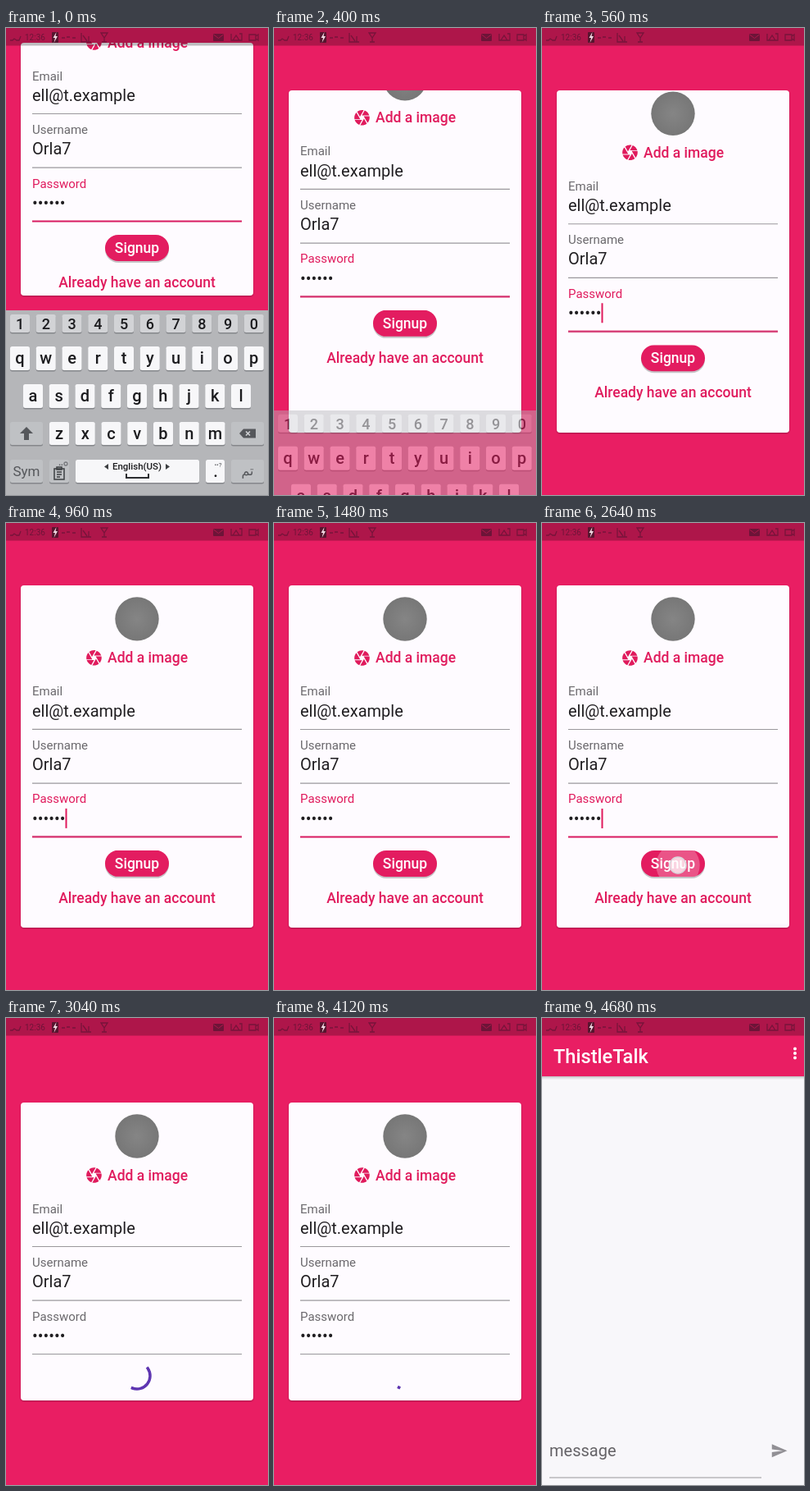
An HTML page that plays this animation: 320x569 px, repeating every 7040 ms.

```html
<!DOCTYPE html>
<html lang="en">
<head>
<meta charset="utf-8">
<title>Signup flow</title>
<style>
  html, body { margin: 0; width: 100%; height: 100%; overflow: hidden; }
  body { position: relative; background: #e91e63; font-family: Roboto, sans-serif; }
  svg { position: absolute; left: 0; top: 0; width: 320px; height: 569px; overflow: hidden; }
  .stage { position: absolute; left: 0; top: 0; width: 320px; height: 569px; overflow: hidden; background: #e91e63; }
  .stage * { animation-duration: 7040ms; animation-iteration-count: infinite; }
  .step { animation-timing-function: step-end; }
  .smooth { animation-timing-function: linear; }

  .card { position: absolute; left: 18px; width: 284px; overflow: hidden; border-radius: 4px;
    background: #fefbff; animation-name: card; }
  .shade { position: absolute; left: 18px; width: 284px; border-radius: 4px;
    box-shadow: 0 1px 2px rgba(0,0,0,.3); animation-name: card; }
  .card svg { left: -18px; height: 600px; }
  @keyframes card {
    0% { top: 18px; height: 308px; }
    4.261% { top: 76px; height: 417px; }
    39.73%, 100% { top: 103px; height: 363px; }
  }

  .label { font-size: 15px; fill: #6b696d; }
  .value { font-size: 20px; fill: #201e21; }
  .bold { font-size: 17.5px; font-weight: 500; fill: #e01b5d; }
  .rule { stroke: #9a989c; stroke-width: 1.2; }

  #focusLabel { animation-name: tint; }
  @keyframes tint { 0%, 39.73% { fill: #e01b5d; } 42.571%, 100% { fill: #6b696d; } }
  #focusRule { stroke: #d81b60; stroke-width: 2; animation-name: blur; }
  @keyframes blur { 0%, 39.73% { opacity: 1; } 42.571%, 100% { opacity: 0; } }
  #cursor { animation-name: blink; }
  @keyframes blink {
    0% { opacity: 0; } 7.244% { opacity: 1; } 14.347% { opacity: 0; } 21.449% { opacity: 1; }
    28.551% { opacity: 0; } 35.653% { opacity: 1; } 39.73%, 100% { opacity: 0; }
  }
  #buttons { animation-name: buttons; }
  @keyframes buttons { 0% { opacity: 1; } 39.73%, 100% { opacity: 0; } }
  #ripple { animation-name: ripple; }
  @keyframes ripple {
    0%, 35.795% { r: 0; opacity: .25; } 38.5% { r: 42px; opacity: .25; } 39.6%, 100% { r: 42px; opacity: 0; }
  }
  #glow { transform-origin: 0 417px; animation-name: glow; }
  @keyframes glow {
    0%, 24.148% { opacity: 0; transform: scaleY(0); }
    30.114% { opacity: .166; transform: scaleY(.68); }
    32.102% { opacity: .17; transform: scaleY(.7); }
    38.352%, 100% { opacity: 0; transform: scaleY(0); }
  }

  #touch { animation-name: tap; }
  @keyframes tap {
    0% { opacity: 0; } 23.011% { opacity: 1; } 32.102% { opacity: 0; }
    35.795% { opacity: 1; } 37.784%, 100% { opacity: 0; }
  }
  #touch circle { animation-name: drag; }
  @keyframes drag {
    0%, 23.011% { transform: translate(272px, 392px); }
    30.114% { transform: translate(287px, 268px); }
    32.102% { transform: translate(287px, 257px); }
    32.2%, 100% { transform: translate(166px, 417px); }
  }

  #keyboard { animation-name: hide; animation-timing-function: ease-in; }
  @keyframes hide {
    0%, 3.835% { transform: none; opacity: 1; }
    6.534%, 100% { transform: translateY(225px); opacity: 0; }
  }
  .cap { font-size: 20px; font-weight: 500; fill: #1c1c1f; text-anchor: middle; }
  .hint { fill: #55575b; text-anchor: middle; }

  #chat { animation-name: chat; }
  @keyframes chat { 0% { opacity: 0; } 60.653%, 100% { opacity: 1; } }
  .spinner { fill: none; stroke: #5e35b1; stroke-width: 3.5; stroke-linecap: square; }
</style>
</head>
<body>
<div class="stage">
  <div class="shade step"></div>
  <div class="card step">
    <svg viewBox="0 0 320 600">
      <defs>
        <radialGradient id="photo">
          <stop offset="0" stop-color="#858585"/><stop offset="1" stop-color="#777"/>
        </radialGradient>
        <clipPath id="pill"><rect x="121" y="323" width="78" height="32" rx="16"/></clipPath>
      </defs>
      <g id="form">
        <circle cx="160" cy="41" r="26.7" fill="url(#photo)"/>
        <path transform="translate(96.3 77.3) scale(.93)" fill="#e01b5d" d="M9.4 10.5l4.77-8.26C13.47 2.09 12.75 2 12 2c-2.4 0-4.6.85-6.32 2.25l3.66 6.35.06-.1zM21.54 9c-.92-2.92-3.15-5.26-6-6.34L11.88 9h9.66zm.26 1h-7.49l.29.5 4.76 8.25C20.98 17.02 22 14.63 22 12c0-.69-.07-1.35-.2-2zM8.54 12l-3.9-6.75C3.01 7.03 2 9.39 2 12c0 .69.07 1.35.2 2h7.49l-1.15-2zm-6.08 3c.92 2.92 3.15 5.26 6 6.34L12.12 15H2.46zm11.27 0l-3.9 6.76c.7.15 1.42.24 2.17.24 2.4 0 4.6-.85 6.32-2.25l-3.66-6.35-.93 1.6z"/>
        <text class="bold" x="124" y="94.5">Add a image</text>
        <text class="label" x="32" y="134.5">Email</text>
        <text class="value" x="32" y="160">ell@t.example</text>
        <path class="rule" d="M32 175.5H288"/>
        <text class="label" x="32" y="200">Username</text>
        <text class="value" x="32" y="225">Orla7</text>
        <path class="rule" d="M32 241.2H288"/>
        <text class="label smooth" id="focusLabel" x="32" y="265.5">Password</text>
        <text class="value" x="32" y="291">••••••</text>
        <rect class="step" id="cursor" x="72.5" y="272" width="2" height="24" fill="#e01b5d"/>
        <path class="rule" d="M32 306.5H288"/>
        <path class="smooth" id="focusRule" d="M32 306.5H288"/>
        <g class="step" id="buttons">
          <rect x="121" y="325" width="78" height="32" rx="16" fill="#000" opacity=".22"/>
          <rect x="121" y="323" width="78" height="32" rx="16" fill="#e31c60"/>
          <g clip-path="url(#pill)"><circle class="smooth" id="ripple" cx="166" cy="341" fill="#fff"/></g>
          <text class="bold" x="160" y="345" text-anchor="middle" style="fill:#fff">Signup</text>
          <text class="bold" x="160" y="387" text-anchor="middle">Already have an account</text>
        </g>
      </g>
      <g class="smooth" id="glow"><circle cx="223.5" cy="786" r="426" fill="#673ab7"/></g>
      <path class="spinner" id="formSpinner"/>
    </svg>
  </div>

  <svg viewBox="0 0 320 569">
    <g class="step" id="touch">
      <circle class="smooth" r="10" fill="#fff" fill-opacity=".75" stroke="#d9d6db" stroke-width="1.5"/>
    </g>
    <g id="keyboard"></g>
    <g class="step" id="chat">
      <rect width="320" height="569" fill="#f8f7fa"/>
      <rect y="71" width="320" height="1.5" fill="#000" opacity=".2"/>
      <rect y="72.5" width="320" height="2" fill="#000" opacity=".07"/>
      <rect width="320" height="71" fill="#e91e63"/>
      <text x="14" y="55" font-size="23.6" font-weight="500" fill="#fff">ThistleTalk</text>
      <g fill="#fff"><circle cx="309" cy="37.5" r="2"/><circle cx="309" cy="43" r="2"/><circle cx="309" cy="48.5" r="2"/></g>
      <text x="9" y="534" font-size="20" fill="#656367">message</text>
      <path class="rule" d="M9 560H268"/>
      <path transform="translate(279 516.5) scale(.89)" fill="#929095" d="M2.01 21L23 12 2.01 3 2 10l15 2-15 2z"/>
      <path class="spinner" id="chatSpinner"/>
    </g>

    <g id="status">
      <rect width="320" height="21.5" opacity=".25"/>
      <g fill="none" stroke="#6d1438" stroke-width="1.3" opacity=".85">
        <path d="M5 15h3l2-2 3 2h3l2-5M68 12h4m2-1h4m3 1h4M92 6v11h12M94 9l5 7m2-6v7M116 6h8l-4 6zm4 6v5m-3 0h6"/>
        <path d="M275 7v8h3m7-8h3v8h-3M281 9l-4 6h8zM297 8h8v7h-8zm8 2 3-2v7l-3-2"/>
      </g>
      <text x="23" y="15" font-size="10" fill="#6d1438">12:36</text>
      <rect x="56" y="5" width="8" height="13" rx="1" fill="#57152f"/>
      <path d="M61.5 5l-4 7h2.5l-1.500 6 4.500-8h-2.500z" fill="#f1dce4"/>
      <rect x="253" y="7" width="13" height="9" rx="1" fill="#6d1438"/>
      <path d="M253.500 8l6 4.500 6-4.500" fill="none" stroke="#af174a"/>
    </g>
  </svg>
</div>

<script>
const LOOP = 7040, RESIZE = 300, SUBMIT = 2797, OPEN = 4270, LOADED = 4670;
const $ = id => document.getElementById(id);

// Keyboard
const PITCH = 31.75;
const text = (x, y, label, cls = "cap", size = 20) =>
  `<text class="${cls}" x="${x}" y="${y}" style="font-size:${size}px">${label}</text>`;
const key = (x, y, w, h, fill) =>
  `<rect x="${x}" y="${y + 1.5}" width="${w}" height="${h}" rx="2.500" fill="#85878b"/>` +
  `<rect x="${x}" y="${y}" width="${w}" height="${h}" rx="2.500" fill="${fill}"/>`;
const row = (letters, x, y, h, fill, base, size) => [...letters].map((c, i) => {
  const cx = x + i * PITCH;
  return key(cx - 12, y, 24, h, fill) + text(cx, base, c, "cap", size);
}).join("");

const LIGHT = "#f7f7f9", MID = "#d2d3d6", DARK = "#bfc1c4";
$("keyboard").innerHTML =
  `<rect y="344" width="320" height="225" fill="#b5b6b9"/>` +
  row("1234567890", 17, 349, 22, MID, 367, 18) +
  row("qwertyuiop", 17, 388, 29, LIGHT, 409, 20) +
  row("asdfghjkl", 33, 434, 29, LIGHT, 455, 20) +
  row("zxcvbnm", 65, 480, 28, LIGHT, 501, 20) +
  key(5, 480, 40, 28, DARK) + key(275, 480, 40, 28, DARK) +
  `<path d="M25 486l8 8h-5v8h-6v-8h-5z" fill="#55575b"/>` +
  `<path d="M285 494l5-5.500h15v11h-15z" fill="#55575b"/>` +
  `<path d="M293 491.500l5 5m0-5l-5 5" stroke="#d2d3d6" stroke-width="1.500"/>` +
  key(5, 526, 40, 28, DARK) + text(25, 546, "Sym", "hint", 17) +
  key(53, 526, 24, 28, DARK) +
  `<path d="M59 537h12v13H59zM62 535h6v3h-6zM62 541h6m-6 3h6m-6 3h4" fill="none" stroke="#3d3f42" stroke-width="1.500"/>` +
  text(67, 535, "••", "hint", 8) + `<circle cx="73" cy="531" r="2" fill="none" stroke="#77797d" stroke-width="1.300"/>` +
  key(85, 526, 151, 28, LIGHT) + text(160, 538, "English(US)", "cap", 11.5) +
  `<path d="M125 531v7l-5-3.500zM195 531v7l5-3.500z" fill="#3d3f42"/>` +
  `<path d="M147 543v5h27v-5" fill="none" stroke="#2b2c2f" stroke-width="2"/>` +
  key(244, 526, 23, 28, LIGHT) + text(256, 547, ".") + text(259, 535, "••?", "hint", 8) +
  key(275, 526, 40, 28, DARK) + text(295, 545, "تم", "hint", 16);

// Cubic (.4, 0, .2, 1), solved for x by bisection
function ease(x) {
  let lo = 0, hi = 1;
  for (let i = 0; i < 24; i++) {
    const s = (lo + hi) / 2, r = 1 - s;
    if (1.2 * r * r * s + .6 * r * s * s + s ** 3 < x) lo = s; else hi = s;
  }
  return lo * lo * (3 - 2 * lo);
}
const clamp = x => Math.max(0, Math.min(1, x));

// Indeterminate progress ring: the head runs ahead, then the tail catches up
function spinner(ms, cx, cy) {
  const phase = ms % 1333 / 1333;
  const head = ease(clamp(phase * 2)), tail = ease(clamp(phase * 2 - 1));
  const start = -90 + 270 * tail + 360 * (ms / 2222) + 90 * phase;
  const end = start + Math.max(270 * (head - tail), .5);
  const at = deg => {
    const a = deg * Math.PI / 180;
    return `${cx + 16 * Math.cos(a)} ${cy + 16 * Math.sin(a)}`;
  };
  return `M${at(start)}A16 16 0 ${end - start > 180 ? 1 : 0} 1 ${at(end)}`;
}

function draw(t) {
  // Critically damped spring back to the top
  const k = 13.2 * Math.max(0, t - RESIZE) / 1000;
  const scroll = 89 * (1 + k) * Math.exp(-k);
  $("form").setAttribute("transform", `translate(0 ${-scroll})`);

  const sending = t >= SUBMIT && t < OPEN;
  $("formSpinner").setAttribute("d", sending ? spinner(Math.min(t - SUBMIT, 1297), 160, 333) : "");
  const loading = t >= OPEN && t < LOADED;
  $("chatSpinner").setAttribute("d", loading ? spinner(t - OPEN, 160, 286) : "");
}

let begin;
function frame(now) {
  begin ??= now;
  draw((now - begin) % LOOP);
  requestAnimationFrame(frame);
}
draw(0);
requestAnimationFrame(frame);
</script>
</body>
</html>
```
